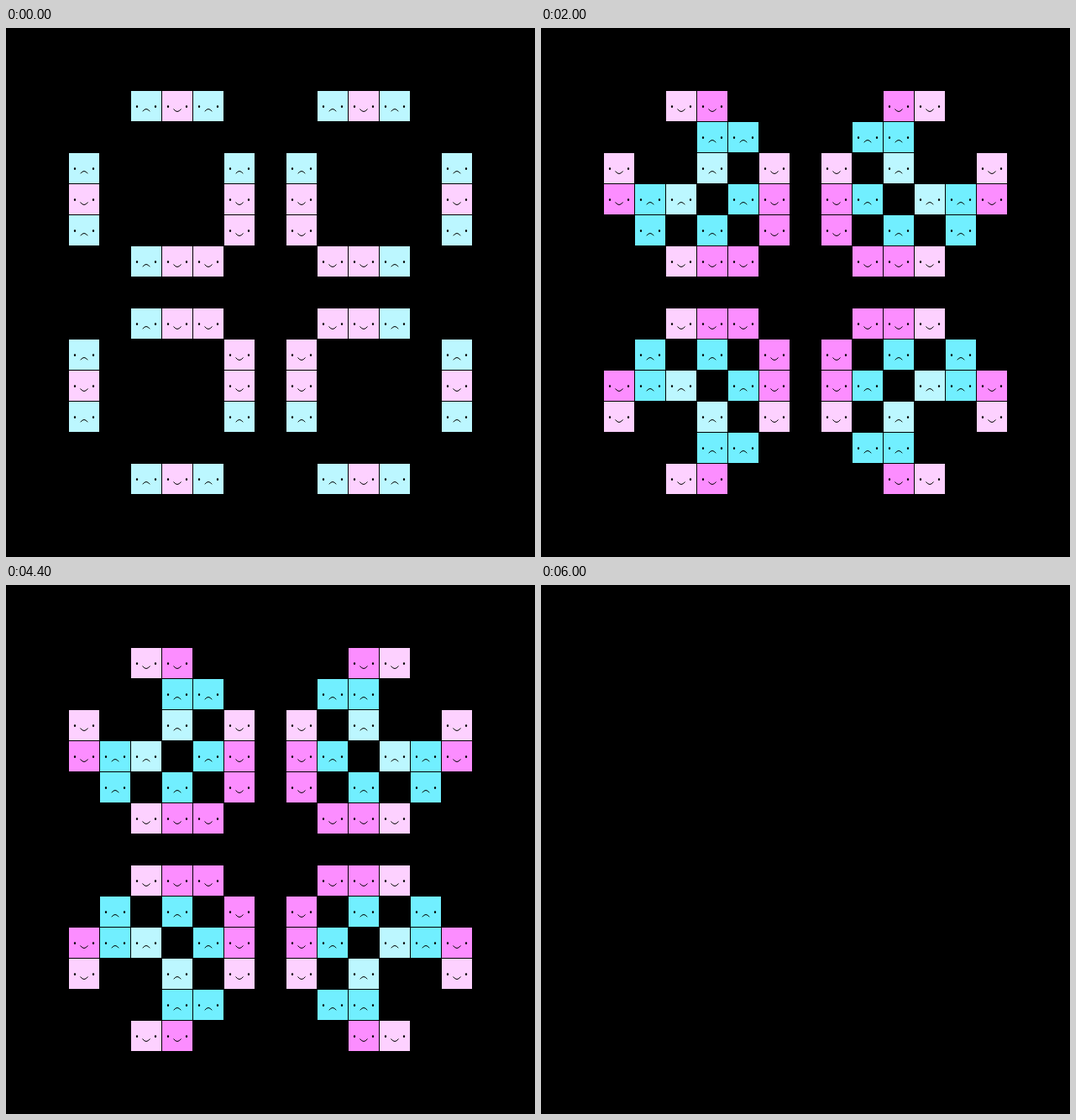
Recreate the animation shown at these times as an HTML page. Size 630 px wide and 630 px high, loop 6.8 s.

```html
<!DOCTYPE html>
<html lang="en">
<head>
<meta charset="utf-8">
<title>Pulsar</title>
<style>
html, body { margin: 0; width: 100%; height: 100%; overflow: hidden; background: #000; }
svg { display: block; }
</style>
</head>
<body>
<svg id="stage" width="630" height="630" viewBox="0 0 630 630">
  <defs>
    <g id="eyes">
      <ellipse cx="7" cy="18.5" rx="1.1" ry="1.5"/>
      <ellipse cx="29" cy="18.5" rx="1.1" ry="1.5"/>
    </g>
    <g id="happy">
      <use href="#eyes"/>
      <path d="M13.5 21.5Q18 27.5 22.5 21.5" fill="none" stroke="#000"/>
    </g>
    <g id="sad">
      <use href="#eyes"/>
      <path d="M13.8 24.3Q18 18.7 22.2 24.3" fill="none" stroke="#000"/>
    </g>
  </defs>
  <rect width="630" height="630"/>
  <g id="cells"></g>
</svg>
<script>
const N = 17, PITCH = 37, SIZE = 36;
const STEP = 400, GENS = 15, LOOP = 6800;
const COLORS = {
  happy: { young: '#fdd1ff', old: '#fc8dff' },
  sad: { young: '#bcf7ff', old: '#71efff' }
};
const layer = document.getElementById('cells');

// Pulsar: bars three cells long, mirrored around the centre.
function seed() {
  const edge = [2, 7, 9, 14], bar = [4, 5, 6, 10, 11, 12];
  const grid = new Array(N * N).fill(0);
  for (const a of edge) for (const b of bar) grid[a * N + b] = grid[b * N + a] = 1;
  return grid;
}

function evolve(grid) {
  return grid.map((alive, i) => {
    const x = i % N, y = Math.floor(i / N);
    let n = -alive;
    for (let v = Math.max(0, y - 1); v <= Math.min(N - 1, y + 1); v++)
      for (let u = Math.max(0, x - 1); u <= Math.min(N - 1, x + 1); u++)
        n += grid[v * N + u];
    return n === 3 || (alive && n === 2) ? 1 : 0;
  });
}

const gens = [seed()];
while (gens.length <= GENS) gens.push(evolve(gens[gens.length - 1]));

// Cells that die next are sad; newborn cells are pale.
function markup(g) {
  if (g >= GENS) return '';
  return gens[g].map((alive, i) => {
    if (!alive) return '';
    const mood = gens[g + 1][i] ? 'happy' : 'sad';
    const age = g > 0 && gens[g - 1][i] ? 'old' : 'young';
    const x = 1 + PITCH * (i % N), y = 1 + PITCH * Math.floor(i / N);
    return `<g transform="translate(${x} ${y})">` +
      `<rect width="${SIZE}" height="${SIZE}" fill="${COLORS[mood][age]}"/>` +
      `<use href="#${mood}"/></g>`;
  }).join('');
}

let shown = -1;
function draw(ms) {
  const g = Math.min(GENS, Math.floor((ms % LOOP) / STEP));
  if (g === shown) return;
  shown = g;
  layer.innerHTML = markup(g);
}

const start = performance.now();
function tick() {
  draw(performance.now() - start);
  requestAnimationFrame(tick);
}
tick();
</script>
</body>
</html>
```
